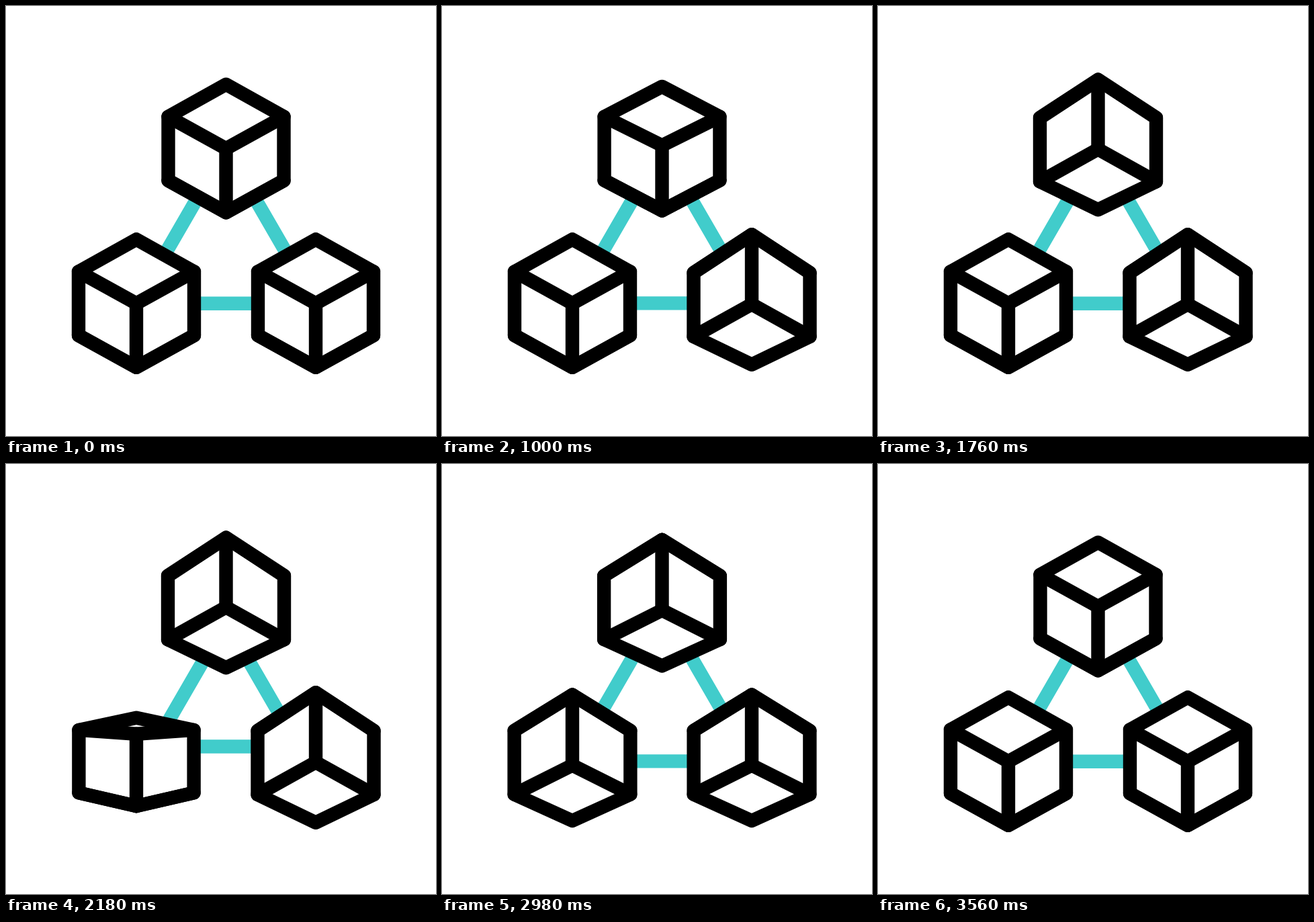
An HTML page with a canvas that plays this animation: 640x640 px, repeating every 3600 ms.

```html
<!DOCTYPE html>
<html>
<head>
<meta charset="utf-8">
<style>
html, body { margin: 0; width: 100%; height: 100%; overflow: hidden; background: #fff; }
canvas { display: block; }
</style>
</head>
<body>
<canvas id="stage" width="640" height="640"></canvas>
<script>
const ctx = document.getElementById('stage').getContext('2d');
const LOOP = 3600;
const FLIP = 785;
const RETURN_START = 2960;
const RETURN = 600;

// Centre of each cube and the time it starts to flip
const cubes = [
  { x: 327.5, y: 212.2, start: 975 },
  { x: 461, y: 442.8, start: 45 },
  { x: 194, y: 442.8, start: 1925 }
];

function phase(time, start, duration) {
  const t = Math.min(1, Math.max(0, (time - start) / duration));
  return t + 0.13 * t * (1 - t);
}

function trace(points, closed) {
  ctx.beginPath();
  points.forEach(([x, y]) => ctx.lineTo(x, y));
  if (closed) ctx.closePath();
}

function drawLinks(scale) {
  const cx = 327.5, cy = 327.5;
  trace(cubes.map(c => [cx + (c.x - cx) * scale, cy + (c.y - cy) * scale]), true);
  ctx.strokeStyle = '#41cccb';
  ctx.stroke();
}

// p = 0 shows the top face, p = 1 shows the bottom face
function drawCube({ x, y }, p) {
  const w = 86 - 2 * p + 2.5 * p * p;
  const upper = -47.5 + 1.7 * p;
  const lower = 47.5 - 5 * p + 6.7 * p * p;
  const shift = 47.5 - 98.25 * p;
  const bulge = (49.7 * p - 41.2 * p * p) / 2;
  const frontTop = -47.5 + shift - bulge;
  const frontBottom = 47.5 + shift + bulge;
  const top = Math.min(frontTop, -95.5 + 86 * p);
  const bottom = Math.max(frontBottom, 21.5 + 69.5 * p);

  ctx.save();
  ctx.translate(x, y);
  ctx.strokeStyle = '#000';
  ctx.fillStyle = '#fff';
  trace([[0, top], [w, upper], [w, lower], [0, bottom], [-w, lower], [-w, upper]], true);
  ctx.fill();
  ctx.stroke();
  for (const [side, front] of [[upper, frontTop], [lower, frontBottom]]) {
    trace([[-w, side], [0, front], [w, side]]);
    ctx.stroke();
  }
  trace([[0, frontTop], [0, frontBottom]]);
  ctx.stroke();
  ctx.restore();
}

function draw(time) {
  const back = phase(time, RETURN_START, RETURN);
  const flips = cubes.map(c => phase(time, c.start, FLIP));
  const squeeze = [...flips, back].reduce((sum, p) => sum + Math.sin(Math.PI * p) ** 2, 0);

  ctx.clearRect(0, 0, 640, 640);
  ctx.lineWidth = 20.4;
  ctx.lineJoin = ctx.lineCap = 'round';
  drawLinks(1 - 0.24 * squeeze);
  cubes.forEach((c, i) => drawCube(c, flips[i] - back));
}

const origin = performance.now();
function frame() {
  draw((performance.now() - origin) % LOOP);
  requestAnimationFrame(frame);
}
frame();
</script>
</body>
</html>
```
